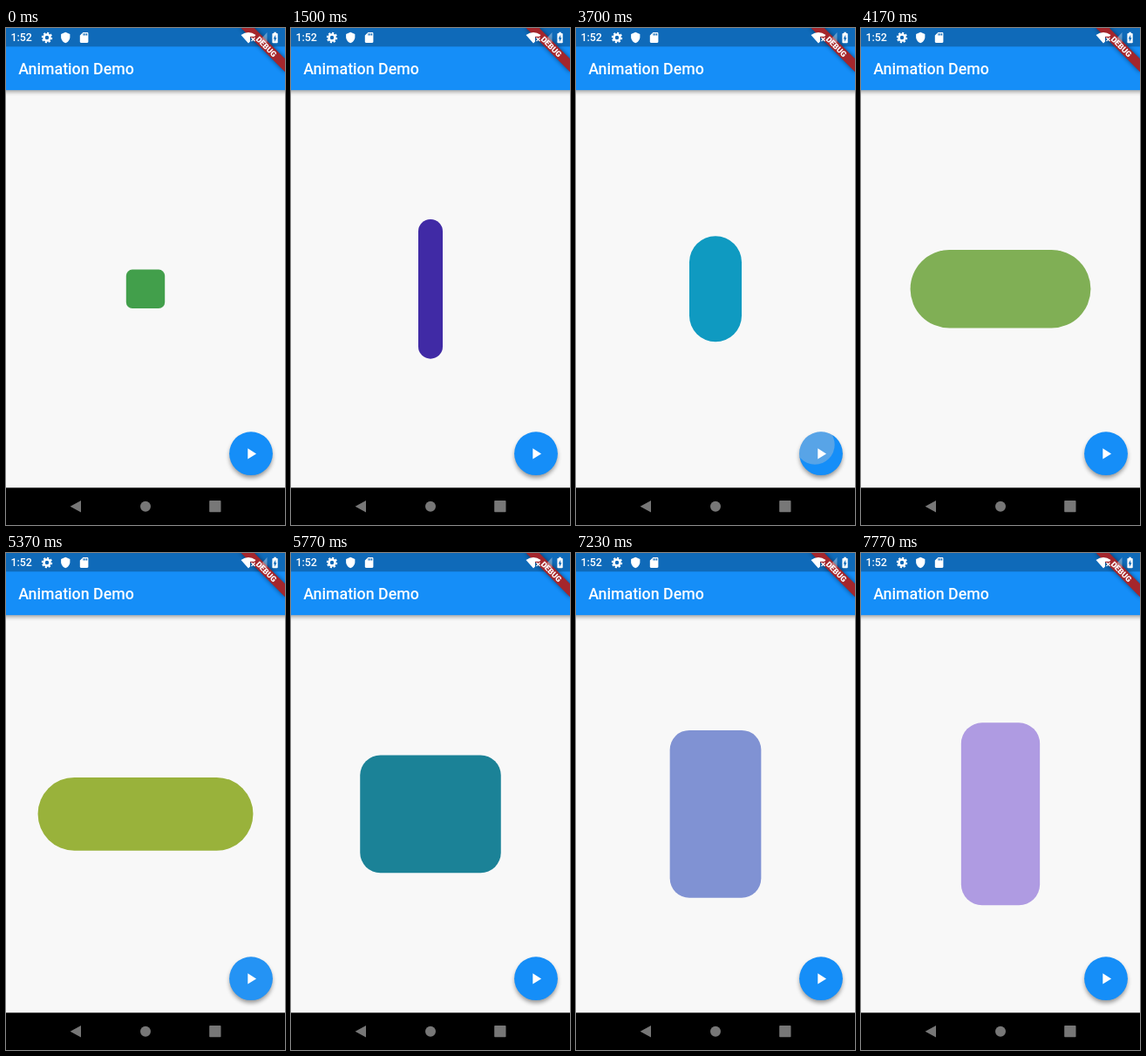
These frames come from a looping animation (320x569 px, 8000 ms). An HTML page:

```html
<!DOCTYPE html>
<html lang="en">
<head>
<meta charset="utf-8">
<title>Animated container</title>
<style>
  html, body { margin: 0; width: 100%; height: 100%; overflow: hidden; background: #f8f8f8; }
  svg { display: block; width: 100%; height: 100%; }
  text { font-family: Roboto, "Noto Sans", sans-serif; fill: #fff; }
</style>
</head>
<body>
<svg viewBox="0 0 320 569">
  <defs>
    <filter id="blur" x="-50%" y="-50%" width="200%" height="200%"><feGaussianBlur stdDeviation="2.6"/></filter>
    <clipPath id="fabClip"><circle cx="281" cy="487.2" r="24.9"/></clipPath>
  </defs>
  <rect width="320" height="569" fill="#f8f8f8"/>
  <rect id="box"/>

  <!-- app bar -->
  <rect x="-8" y="25" width="336" height="48" opacity=".38" filter="url(#blur)"/>
  <rect width="320" height="71.1" fill="#158ef8"/>
  <rect width="320" height="21.3" fill="#0f6ab9"/>
  <text x="14.2" y="53.2" font-size="17.8" font-weight="500">Animation Demo</text>

  <!-- floating button -->
  <circle cx="281" cy="490.5" r="24.5" opacity=".4" filter="url(#blur)"/>
  <circle cx="281" cy="487.2" r="24.9" fill="#158ef8"/>
  <g clip-path="url(#fabClip)"><circle id="splash" cx="274" cy="477" fill="#c8c8c8"/></g>
  <path d="M277.3 481.2v12.4l9.8-6.2z" fill="#fff"/>

  <!-- corner banner -->
  <g transform="translate(320 0) rotate(45)">
    <rect x="-35.6" y="24.9" width="71.2" height="10.7" opacity=".5" filter="url(#blur)"/>
    <rect x="-35.6" y="24.9" width="71.2" height="10.7" fill="#a4262c"/>
    <text y="33.5" font-size="9.07" font-weight="900" text-anchor="middle">DEBUG</text>
  </g>

  <!-- status bar -->
  <text x="5.5" y="15.4" font-size="12.4" font-weight="500">1:52</text>
  <g fill="none" stroke="#fff">
    <circle cx="47" cy="11" r="3.5" stroke-width="2.6"/>
    <circle cx="47" cy="11" r="5.3" stroke-width="1.8" pathLength="16" stroke-dasharray="1.1 .9"/>
    <path d="M281.5 11l4 4m0-4l-4 4" stroke-width="1.3"/>
  </g>
  <g fill="#fff" fill-rule="evenodd">
    <path transform="translate(61.4 4.1) scale(.57)" d="M12 1L3 5v6c0 5.55 3.84 10.74 9 12 5.16-1.26 9-6.45 9-12V5z"/>
    <path transform="translate(82.4 3.8) scale(.6)" d="M18 2h-8L4 8v12c0 1.1.9 2 2 2h12c1.1 0 2-.9 2-2V4c0-1.1-.9-2-2-2zM12 8h-2V4h2zM15 8h-2V4h2zM18 8h-2V4h2z"/>
    <path d="M269.5 8Q278 2 286.5 8L285 9.7H280V15.6L278 17.5z"/>
    <path d="M288.5 17h11V5z" opacity=".35"/>
    <path transform="translate(301 3.4) scale(.63)" d="M15.67 4H14V2h-4v2H8.33C7.6 4 7 4.6 7 5.33v15.33C7 21.4 7.6 22 8.33 22h7.33c.74 0 1.34-.6 1.34-1.33V5.33C17 4.6 16.4 4 15.67 4zM11 20v-5.5H9L13 7v5.5h2z"/>
  </g>

  <!-- navigation bar -->
  <rect y="526.3" width="320" height="42.7"/>
  <g fill="#777">
    <path d="M86 541v13.6l-12.4-6.8z"/>
    <circle cx="160" cy="547.7" r="6"/>
    <rect x="233.2" y="541" width="13.3" height="13.3" rx=".8"/>
  </g>
</svg>
<script>
const LOOP = 8000, MOVE = 1000, FADE = 200;
const CX = 160, CY = 298.8;

// press: finger down; start: container begins to move to this state
const states = [
  { w: 44.4, h: 44.4, r: 7.1, rgb: [66, 159, 75] },
  { press: 975, start: 1000, w: 23.3, h: 193, r: 40, rgb: [63, 8, 191] },
  { press: 2250, start: 2272, w: 60, h: 121, r: 50, rgb: [15, 154, 193] },
  { press: 3665, start: 3688, w: 255, h: 79, r: 50, rgb: [165, 182, 50] },
  { press: 5150, start: 5215, w: 143.4, h: 145.6, r: 18, rgb: [0, 120, 171] },
  { press: 6740, start: 6765, w: 90.3, h: 209, r: 24, rgb: [175, 155, 226] }
];

const box = document.getElementById("box");
const splash = document.getElementById("splash");
const clamp = v => Math.min(1, Math.max(0, v));
const lerp = (a, b, k) => a + (b - a) * k;

// cubic-bezier(.4, 0, .2, 1)
function ease(x) {
  if (x <= 0 || x >= 1) return clamp(x);
  let lo = 0, hi = 1;
  for (let i = 0; i < 24; i++) {
    const s = (lo + hi) / 2, q = 1 - s;
    if (1.2 * q * q * s + 0.6 * q * s * s + s * s * s < x) lo = s; else hi = s;
  }
  return lo * lo * (3 - 2 * lo);
}

function set(el, attrs) {
  for (const key in attrs) el.setAttribute(key, attrs[key]);
}

function draw(t) {
  let i = 1;
  while (i < states.length - 1 && t >= states[i + 1].press) i++;
  const from = states[i - 1], to = states[i];
  const k = ease((t - to.start) / MOVE);
  const w = lerp(from.w, to.w, k), h = lerp(from.h, to.h, k);
  const r = Math.min(lerp(from.r, to.r, k), w / 2, h / 2);
  const rgb = from.rgb.map((c, n) => Math.round(lerp(c, to.rgb[n], k)));
  set(box, {
    x: CX - w / 2, y: CY - h / 2, width: w, height: h, rx: r,
    fill: `rgb(${rgb})`
  });
  set(splash, {
    r: Math.min(45, Math.max(0, (t - to.press) * 0.63)),
    opacity: 0.4 * (1 - clamp((t - to.start) / FADE))
  });
}

const begin = performance.now();
function tick() {
  draw((performance.now() - begin) % LOOP);
  requestAnimationFrame(tick);
}
tick();
</script>
</body>
</html>
```
